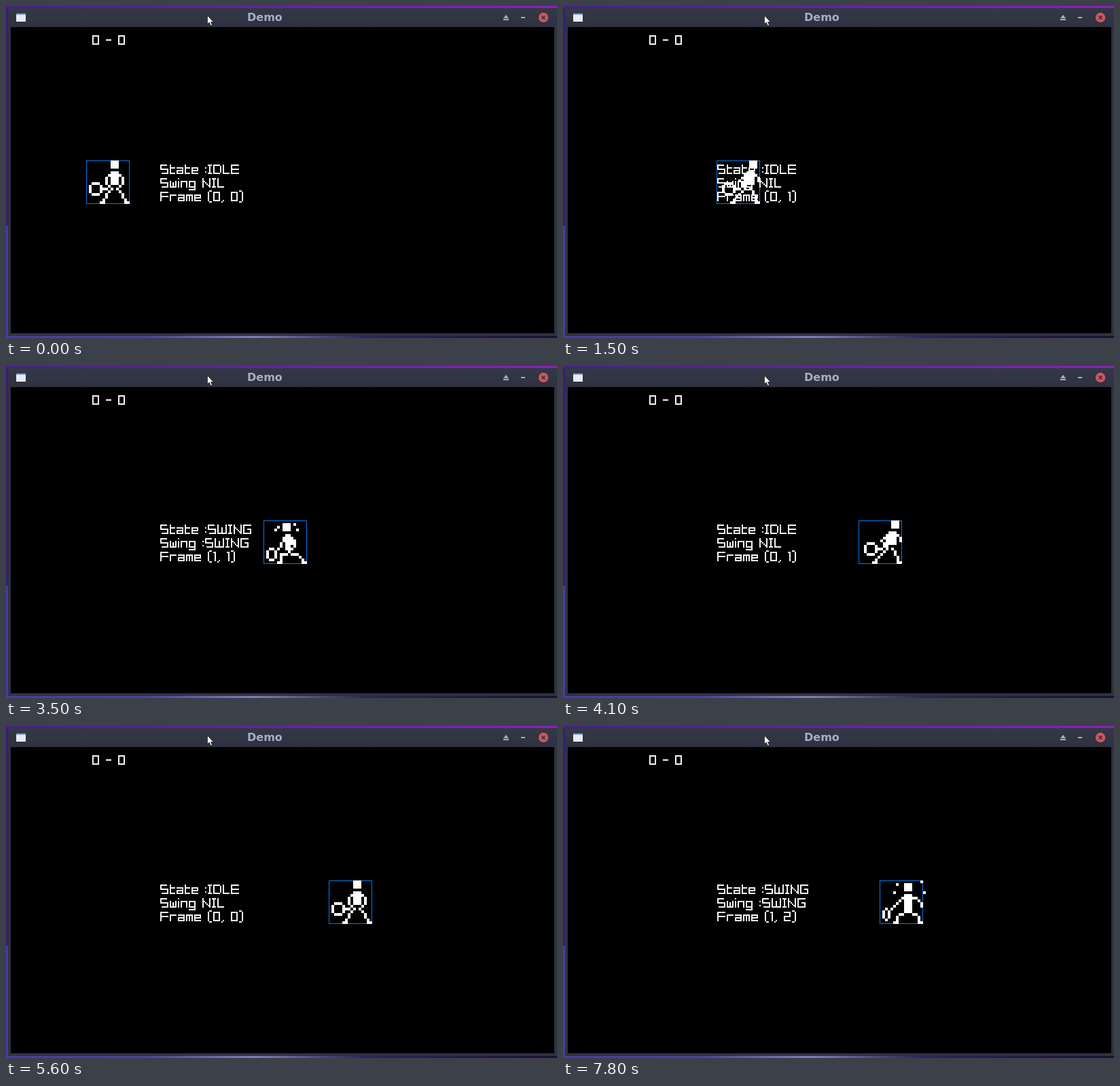
These frames come from a looping animation (811x488 px, 8000 ms). An HTML page:

```html
<!DOCTYPE html>
<html lang="en">
<head>
<meta charset="utf-8">
<title>Demo</title>
<style>
  html, body { margin: 0; width: 100%; height: 100%; overflow: hidden; background: #000; }
  svg { display: block; }
  .pixels { shape-rendering: crispEdges; fill: #f5f5f5; }
</style>
</head>
<body>
<svg width="811" height="488" viewBox="0 0 811 488">
  <defs>
    <linearGradient id="top"><stop stop-color="#42208a"/><stop offset=".5" stop-color="#6a20a8"/><stop offset="1" stop-color="#8c22b8"/></linearGradient>
    <linearGradient id="bottom"><stop stop-color="#4a3ba8"/><stop offset=".25" stop-color="#4c40a0"/><stop offset=".45" stop-color="#857cb8"/><stop offset=".65" stop-color="#30225f"/><stop offset="1" stop-color="#1a1030"/></linearGradient>
    <linearGradient id="bar" x2="0" y2="1"><stop stop-color="#353846"/><stop offset="1" stop-color="#2e3140"/></linearGradient>
  </defs>
  <rect width="811" height="488" fill="url(#bottom)"/>
  <rect width="811" height="4" fill="url(#top)"/>
  <rect y="3" width="4" height="320" fill="#3d1c78"/>
  <rect y="323" width="4" height="162" fill="#4a3aa8"/>
  <path d="M3 485V6q0-3 3-3H811V485z" fill="#2f3241"/>
  <path d="M3 31V6q0-3 3-3H811V31z" fill="url(#bar)"/>
  <rect x="7" y="31" width="800" height="450"/>
  <rect x="15" y="11" width="14" height="12" fill="#e9ebef"/>
  <rect x="15" y="11" width="14" height="2" fill="#7f9fdc"/>
  <text x="355" y="22" font-family="'DejaVu Sans', sans-serif" font-weight="700" font-size="16" fill="#a9adc6">Demo</text>
  <path d="M732 18l4-5 4 5zM732 19h8v2h-8zM758 16h6v2h-6z" fill="#a9adbd"/>
  <circle cx="791" cy="17" r="7.2" fill="#cf5561"/>
  <path d="M788.5 14.5l5 5m0-5l-5 5" stroke="#2f3241" stroke-width="1.6"/>

  <g class="pixels">
    <path id="score" transform="translate(127 43) scale(2)"/>
    <g id="player">
      <rect x=".5" y=".5" width="63" height="63" fill="none" stroke="#0079f1"/>
      <path id="body" transform="scale(4)" fill="#fff"/>
    </g>
    <path id="state" transform="translate(227 233) scale(2)"/>
    <path id="swing" transform="translate(227 253) scale(2)"/>
    <path id="frame" transform="translate(227 273) scale(2)"/>
  </g>
  <path d="M296.500 14v12.500l2.800-2.500 2 5 2.200-1-2-4.500h3.800z" fill="#fff" stroke="#000" stroke-width=".6"/>
</svg>
<script>
const LOOP = 8000, SPEED = .18, START_X = 118;
const $ = id => document.getElementById(id);
const rect = (x, y, w, h) => `M${x} ${y}h${w}v${h}h${-w}z`;
const cell = (x, y) => rect(Math.round(x), Math.round(y), 1, 1);

// Polyline drawn in unit cells.
function line(x, y, ...rest) {
  let d = cell(x, y);
  while (rest.length) {
    const [u, v] = rest.splice(0, 2);
    const n = Math.max(Math.abs(u - x), Math.abs(v - y));
    for (let k = 1; k <= n; k++) d += cell(x + (u - x) * k / n, y + (v - y) * k / n);
    [x, y] = [u, v];
  }
  return d;
}

const mirror = (axis, ...p) =>
  line(...p) + line(...p.map((v, i) => i % 2 ? v : 2 * axis - v));

function ring(cx, cy, rx, ry) {
  let d = '';
  for (let a = 0; a < 12; a++)
    d += cell(cx + rx * Math.cos(a * Math.PI / 6), cy + ry * Math.sin(a * Math.PI / 6));
  return d;
}

// Lettering: every glyph is a set of segments on a box of right edge r,
// top row t and middle row m.
const SEGMENTS = {
  a: (r, t) => line(0, t, r, t),
  b: (r, t, m) => line(r, t, r, m),
  c: (r, t, m) => line(r, m, r, 6),
  d: r => line(0, 6, r, 6),
  e: (r, t, m) => line(0, m, 0, 6),
  f: (r, t, m) => line(0, t, 0, m),
  g: (r, t, m) => line(0, m, r, m),
  h: (r, t, m) => line(r - 2, m, r, m),
  i: () => cell(0, 0),
  j: (r, t, m) => line(r >> 1, m - 1, r >> 1, 6),
  k: () => cell(0, 2) + cell(0, 5),
  l: r => line(r, 6, 0, 7),
  m: (r, t) => line(r >> 1, t, r >> 1, 6),
  n: r => line(0, 1, r, 6),
  o: r => line(0, 0, r - 1, 0, r, 1, r, 5, r - 1, 6, 0, 6),
  q: r => line(r, -1, 1, -1) + line(0, 0, 0, 6) + line(1, 7, r, 7),
  s: r => line(0, 0, r - 1, 0) + line(1, 6, r, 6),
  u: r => line(0, -1, r - 1, -1) + line(r, 0, r, 6) + line(0, 7, r - 1, 7),
  x: r => line(0, 2, r, 2),
  y: r => line(r, 6, r, 8, 0, 8)
};
// Width and segments.
const GLYPHS = {
  ' ': '3', ':': '1k', ',': '2l', '-': '4g', '(': '3q', ')': '3u',
  0: '5abcdef', 1: '2ibc', 2: '5abged', 3: '5abgcd',
  D: '6efo', E: '6adefg', F: '6aefg', G: '6acdefh', I: '3adm', L: '5def',
  N: '6bcefn', S: '6fsgc', W: '7bcdefj',
  a: '5abcdeg', e: '5abdefg', g: '5abcdefy', i: '1efi', m: '5abcefm',
  n: '5abcef', r: '5aef', t: '4iefdx', w: '5bcdefj'
};

function write(id, text) {
  const el = $(id);
  if (el.getAttribute('aria-label') === text) return;
  let d = '', x = 0;
  for (const c of text) {
    const [width, ...segments] = GLYPHS[c];
    const top = /[a-su-z]/.test(c) ? 2 : 0;
    const shape = segments.map(s => SEGMENTS[s](width - 1, top, (top + 6) / 2)).join('');
    d += shape.replace(/M(\S+)/g, (_, left) => 'M' + (+left + x));
    x += +width + 1;
  }
  el.setAttribute('aria-label', text);
  el.setAttribute('d', d);
}

// The feet stay put in every pose; the legs run to them from the hips.
const legs = (left, right, y) =>
  line(left, y, 6, 14, 6, 15, 5, 15) + line(right, y, 14, 14, 14, 15, 15, 15);
const head = (x, y) => rect(x, y, 3, 3);

const POSES = {
  '0, 0': head(9, 0) + rect(9, 4, 3, 5) + mirror(10, 8, 5, 7, 6, 7, 8, 9, 10) +
    legs(8, 12, 11) + ring(3, 10, 2, 2) + line(6, 10, 7, 10),
  '0, 1': head(12, 0) + rect(11, 4, 3, 5) + rect(10, 5, 1, 4) +
    line(9, 6, 8, 7, 10, 9) + line(14, 5, 15, 6, 15, 7) +
    legs(10, 12, 10) + ring(4, 10, 2, 2) + line(7, 10, 8, 10, 9, 9),
  '1, 0': head(8, 1) + rect(8, 5, 3, 6) + mirror(9, 7, 6, 6, 7, 6, 9) +
    legs(8, 11, 11) + ring(2.5, 11, 1.5, 2),
  '1, 1': head(7, 1) + rect(8, 5, 2, 6) + rect(10, 6, 1, 3) +
    line(5, 2, 4, 3) + cell(11, 1) + cell(12, 3) +
    line(7, 6, 7, 7, 6, 8, 6, 9, 5, 10) + line(11, 7, 11, 9) + line(10, 10, 9, 11) +
    line(6, 12, 8, 12) + line(10, 12, 12, 12) + legs(6, 12, 12) + ring(2.5, 12, 1.5, 2),
  '1, 2': head(9, 1) + rect(9, 5, 3, 7) +
    cell(6, 1) + cell(5, 4) + cell(15, 0) + cell(16, 4) +
    line(8, 6, 4, 10) + line(12, 6, 13, 6, 15, 8, 15, 9) +
    mirror(10, 7, 12, 8, 12) + legs(6, 14, 13) + ring(2, 12, .9, 2),
  '1, 3': head(9, 0) + rect(10, 7, 2, 1) + rect(9, 8, 4, 3) + ring(14, 2, 2, 2) +
    line(10, 3, 11, 3) + line(11, 4, 9, 4, 8, 5, 8, 7, 9, 7) + cell(10, 5) +
    line(12, 4, 10, 6) + line(12, 6, 13, 6, 13, 7) + legs(8, 12, 11)
};

// Times at which the controls are held.
const RIGHT = [[150, 633], [1008, 2350], [3790, 4150], [4806, 5233], [6620, 6760], [6960, 7010]];
const LEFT = [[633, 1008], [5350, 5639], [6367, 6570]];
const SWING = [[2650, 3410], [4170, 4690], [5660, 6190], [7050, 7670]];

const heldFor = (spans, t) =>
  spans.reduce((sum, [from, to]) => sum + Math.max(0, Math.min(t, to) - from), 0);
const isHeld = (spans, t) => spans.some(([from, to]) => t >= from && t < to);

function swingFrame(t) {
  if (isHeld(SWING, t)) return 0;
  const since = Math.min(...SWING.map(([, release]) => t < release ? LOOP : t - release));
  return since < 120 ? 1 : since < 270 ? 2 : since < 420 ? 3 : -1;
}

function draw(t) {
  const x = START_X + SPEED * (heldFor(RIGHT, t) - heldFor(LEFT, t));
  const moving = isHeld(RIGHT, t) || isHeld(LEFT, t);
  const hit = swingFrame(t);
  const step = moving ? Math.floor((t - 150) / 117) % 2 : 0;
  const frame = hit < 0 ? `0, ${step}` : `1, ${hit}`;
  $('player').setAttribute('transform', `translate(${Math.round(x)} 227)`);
  $('body').setAttribute('d', POSES[frame]);
  write('state', hit < 0 ? 'State :IDLE' : 'State :SWING');
  write('swing', 'Swing ' + (hit < 0 ? 'NIL' : hit ? ':SWING' : ':WIND'));
  write('frame', `Frame (${frame})`);
}

write('score', '0 - 0');
const begin = performance.now();
function tick() {
  draw((performance.now() - begin) % LOOP);
  requestAnimationFrame(tick);
}
tick();
</script>
</body>
</html>
```
